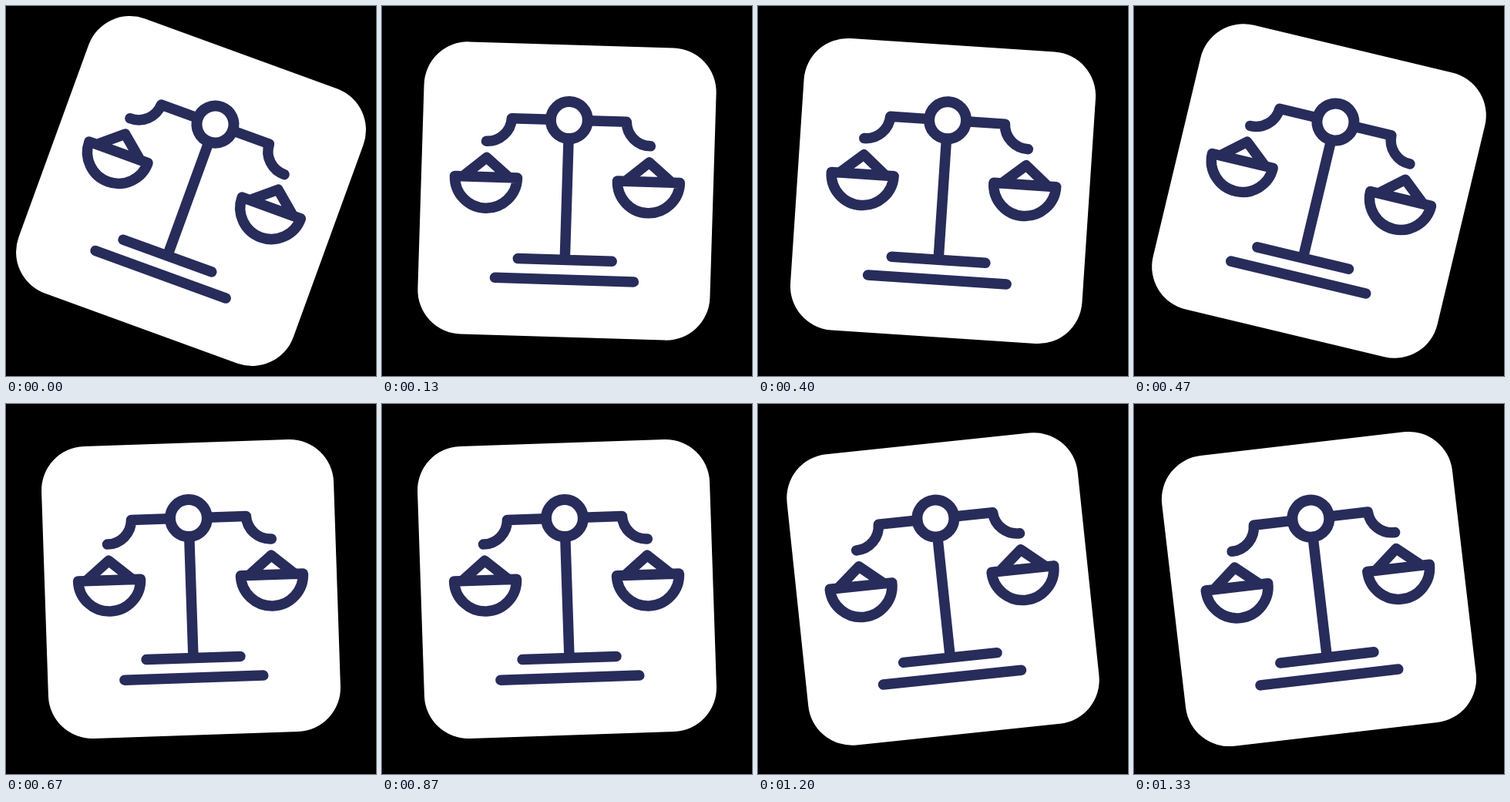
Write an HTML page that moves like this. It is 480 px wide and 480 px high and loops after 1390 ms.

```html
<!DOCTYPE html>
<html lang="en">
<head>
<meta charset="utf-8">
<title>Swinging scales</title>
<style>
  html, body { margin: 0; width: 100%; height: 100%; overflow: hidden; background: #000; }
  svg { display: block; width: 100%; height: 100%; }
  .ink { fill: none; stroke: #282c5a; stroke-width: 13.5; stroke-linecap: round; stroke-linejoin: round; }
</style>
</head>
<body>
<svg viewBox="-240 -240 480 480">
  <defs>
    <g id="arm">
      <path d="M24-92H74.5A31.5 31.5 0 0 0 106.5-61.5"/>
      <path d="M65-15H146A40.5 40.5 0 0 1 65-15ZM75.5-15L105.5-40.3L135.5-15"/>
    </g>
  </defs>
  <g id="card">
    <rect x="-189.6" y="-189.6" width="379.2" height="379.2" rx="57" fill="#fff"/>
    <g class="ink">
      <path d="M0-68V89M-61 89.5H61M-90 115.2H90"/>
      <use href="#arm"/>
      <use href="#arm" transform="scale(-1 1)"/>
      <circle cy="-92" r="24" stroke-width="14"/>
    </g>
  </g>
</svg>
<script>
  const LOOP = 1390, STEP = 200 / 3;
  const HIGH = 20, LOW = -16;
  // Moments, in steps, at which the swing reverses; it starts at HIGH.
  const turns = [0, 3.95, 7.68, 11.49, 15.35, 19.02, 22.8];
  const card = document.getElementById('card');

  // Steps begin on times rounded to 10 ms.
  const startOf = k => Math.round(k * STEP / 10) * 10;

  function stepAt(ms) {
    let k = Math.floor(ms / STEP) + 1;
    while (startOf(k) > ms) k--;
    return k;
  }

  function angleAt(k) {
    let i = 0;
    while (turns[i + 1] <= k) i++;
    const p = (k - turns[i]) / (turns[i + 1] - turns[i]);
    return i % 2 ? LOW + (HIGH - LOW) * p : HIGH + (LOW - HIGH) * p;
  }

  function draw(now) {
    const angle = angleAt(stepAt(now % LOOP));
    card.setAttribute('transform', `rotate(${angle.toFixed(2)})`);
  }

  const begin = performance.now();
  function tick() {
    draw(performance.now() - begin);
    requestAnimationFrame(tick);
  }
  tick();
</script>
</body>
</html>
```
